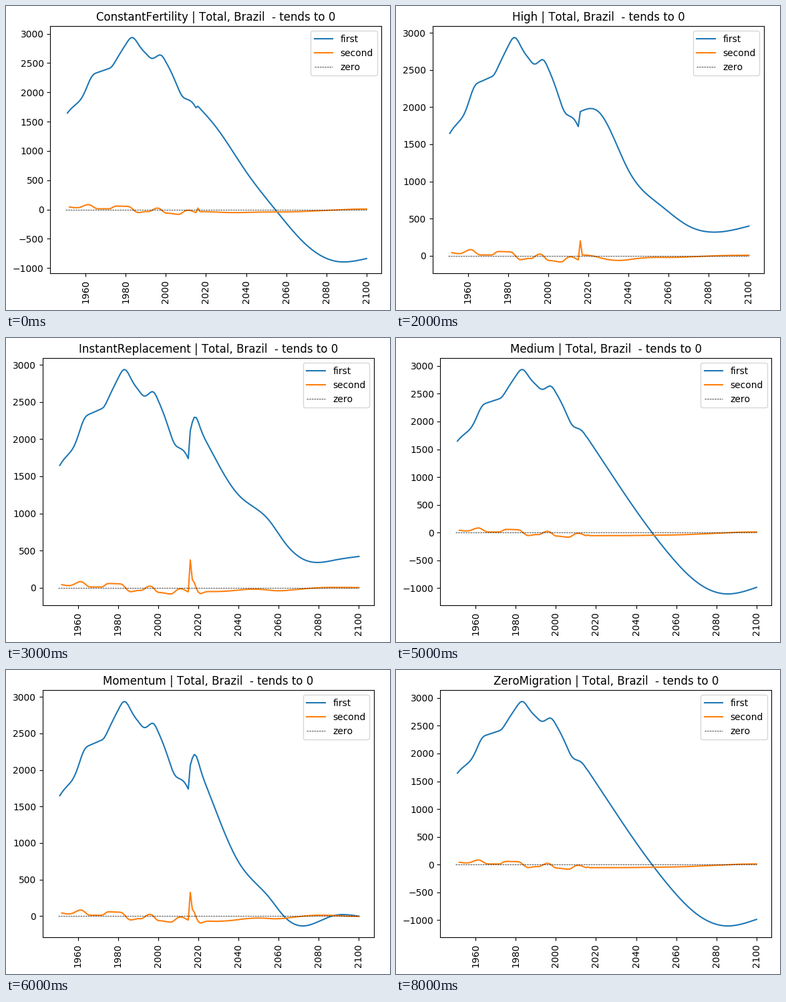
Recreate the animation shown at these times as a matplotlib script. Size 575x455 px, loop 9000 ms.

```python
import matplotlib.pyplot as plt
import numpy as np
from matplotlib.animation import FuncAnimation

plt.rcParams["text.kerning_factor"] = 6

W, H, DPI = 575, 455, 100
AX_W, AX_H, BOTTOM = 496, 369.6, 55.12
YEARS = np.arange(1951, 2101)
KNOTS = [2016, *range(2025, 2101, 15)]


def glide(t, turns):
    """Smoothstep from one turning point to the next."""
    x, y = np.array(turns).T
    i = np.clip(np.searchsorted(x, t, "right") - 1, 0, len(x) - 2)
    f = (t - x[i]) / (x[i + 1] - x[i])
    return y[i] + (y[i + 1] - y[i]) * f * f * (3 - 2 * f)


def spline(values, years=KNOTS):
    """Natural cubic spline through the knots, one value per year from 2016."""
    x, y = np.array(years, float), np.array(values, float)
    n, h = len(x), np.diff(x)
    s = np.diff(y) / h
    a, b = np.eye(n), np.zeros(n)
    for i in range(1, n - 1):
        a[i, i - 1:i + 2] = h[i - 1], 2 * (h[i - 1] + h[i]), h[i]
        b[i] = 6 * (s[i] - s[i - 1])
    m = np.linalg.solve(a, b)
    t = np.arange(2016, 2101)
    i = np.clip(np.searchsorted(x, t, "right") - 1, 0, n - 2)
    d = t - x[i]
    return (y[i] + d * (s[i] - h[i] * (2 * m[i] + m[i + 1]) / 6)
            + d**2 * m[i] / 2 + d**3 * (m[i + 1] - m[i]) / (6 * h[i]))


# Past growth: its yearly change swings between a few turning points
change = glide(np.arange(1952, 2016), [
    (1952, 42), (1954.5, 30), (1956, 30), (1961.5, 84), (1966, 12),
    (1972, 12), (1975, 58), (1981.2, 53), (1986.2, -53), (1990.5, -34),
    (1991.3, -38), (1995.6, 23), (1996.2, 23), (2000.2, -62),
    (2006.4, -83), (2010.6, -14), (2011.4, -13), (2016, -60)])
past = 1647 + np.cumsum([0, *change])

# Future growth per scenario
fertility = spline([1762, 1408, 645, -22, -605, -886, -838])
mortality = spline([1638, 963, -138, -990, -1438, -1395, -1146])
medium = spline([1692, 1200, 395, -325, -885, -1104, -986])
momentum = spline(
    [2063, 2211, 2016, 1707, 1352, 742, 265, -12, -135, 4, -2],
    [2016, 2018, 2021, 2025, 2030, 2040, 2055, 2063, 2072, 2087, 2100])

SCENARIOS = [
    ("ConstantFertility", fertility),
    ("ConstantMortality", mortality),
    ("High", spline([1940, 1940, 1150, 700, 400, 320, 400])),
    ("InstantReplacement",
     momentum + spline([50, 207, 508, 650, 550, 371, 424])),
    ("Low", spline([1430, 670, -320, -1250, -1920, -2000, -1690])),
    ("Medium", medium),
    ("Momentum", momentum),
    ("NoChange", fertility + mortality - medium),
    ("ZeroMigration", medium),
]

fig = plt.figure(figsize=(W / DPI, H / DPI), dpi=DPI, facecolor="white")
ax = fig.add_axes([0, 0, 1, 1])


def draw(k):
    name, future = SCENARIOS[k]
    first = np.concatenate([past, future])
    # Negative tick labels need a wider left margin
    left = 66.45 if first.min() < -500 else 55
    ax.clear()
    ax.set_position([left / W, BOTTOM / H, AX_W / W, AX_H / H])
    ax.plot(YEARS, first, label="first")
    ax.plot(YEARS[1:], np.diff(first), label="second")
    ax.plot([1950, 2100], [0, 0], "k--", lw=0.5, label="zero")
    ax.tick_params(axis="x", rotation=90)
    ax.set_title(f"{name} | Total, Brazil  - tends to 0")
    ax.legend(loc="upper right")
    return ax.get_children()


anim = FuncAnimation(fig, draw, frames=len(SCENARIOS), interval=1000,
                     init_func=lambda: draw(0), repeat=True, repeat_delay=0)
plt.show()
```
